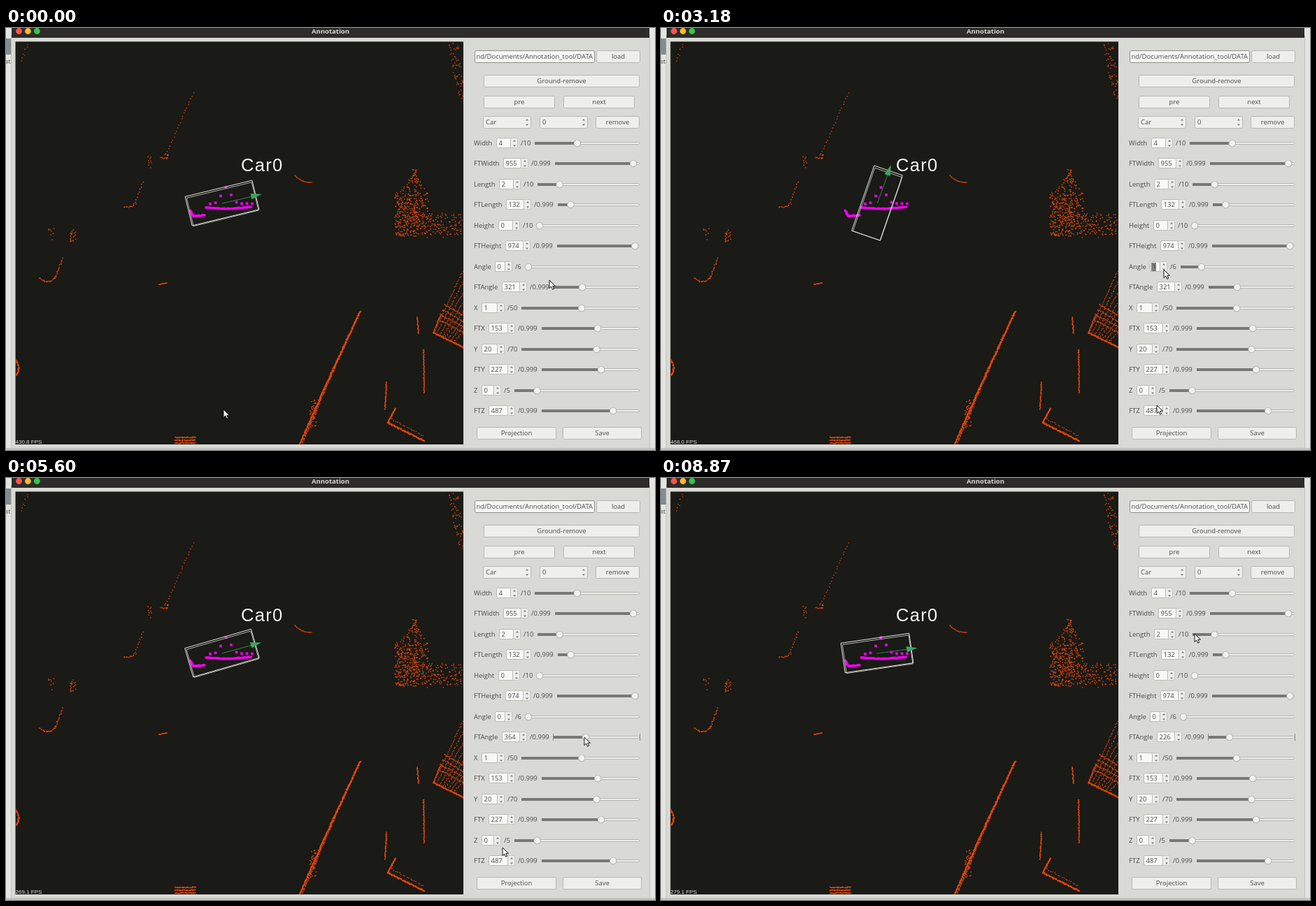
An HTML page with a canvas for the animation above (8.97 s loop, 928 px wide and 604 px high).

```html
<!DOCTYPE html>
<html lang="en">
<head>
<meta charset="utf-8">
<title>Annotation</title>
<style>
html, body { margin: 0; width: 100%; height: 100%; overflow: hidden; background: #dedfda; }
canvas { display: block; width: 928px; height: 604px; }
</style>
</head>
<body>
<canvas id="stage" width="928" height="604"></canvas>
<script>
const W = 928, H = 604, LOOP = 8970, STEP = 130;
const ctx = document.getElementById('stage').getContext('2d');
const UI = '9.5px "Open Sans", "Noto Sans", sans-serif';
const ARIAL = '"Liberation Sans", Arial, sans-serif';
const INK = '#4a4a48';

let seed = 7;
function rnd() {
  seed = (seed * 1664525 + 1013904223) % 4294967296;
  return seed / 4294967296;
}
const jit = a => (rnd() - 0.5) * 2 * a;
const clamp = (v, lo, hi) => Math.min(hi, Math.max(lo, v));

function text(c, s, x, y, font, color, align = 'left') {
  c.font = font;
  c.fillStyle = color;
  c.textAlign = align;
  c.fillText(s, x, y);
}
const label = (c, s, x, mid, align) => text(c, s, x, mid + 3.4, UI, INK, align);

function rect(c, color, x, y, w, h) {
  c.fillStyle = color;
  c.fillRect(x, y, w, h);
}

function box(c, x, y, w, h, fill, border = '#b8b8b2', r = 2) {
  c.beginPath();
  c.roundRect(x + 0.5, y + 0.5, w - 1, h - 1, r);
  c.fillStyle = fill;
  c.fill();
  c.strokeStyle = border;
  c.lineWidth = 1;
  c.stroke();
}

function disc(c, x, y, r, fill) {
  c.beginPath();
  c.arc(x, y, r, 0, 7);
  c.fillStyle = fill;
  c.fill();
}

function button(c, s, x, y, w) {
  box(c, x, y, w, 18, '#eeeeea');
  label(c, s, x + w / 2, y + 9, 'center');
}

function arrows(c, x, mid) {
  c.fillStyle = '#7c7c78';
  for (const d of [-1, 1]) {
    c.beginPath();
    c.moveTo(x - 2, mid + d * 2.5);
    c.lineTo(x + 2, mid + d * 2.5);
    c.lineTo(x, mid + d * 5);
    c.fill();
  }
}

// name, value, limit, lowest value; every property also has a fine "FT" row
const props = [
  ['Width', 4, 10, 0, 955], ['Length', 2, 10, 0, 132], ['Height', 0, 10, 0, 974], ['Angle', 0, 6, 0, 321],
  ['X', 1, 50, -50, 153], ['Y', 20, 70, -70, 227], ['Z', 0, 5, -1, 487]
];
const rows = props.flatMap(([name, value, max, min, fine]) => [
  { name, value, max, min, limit: '/' + max },
  { name: 'FT' + name, value: fine, max: 999, min: min < 0 ? -999 : 0, limit: '/0.999' }
]);
ctx.font = UI;
rows.forEach((r, i) => {
  const width = s => ctx.measureText(s).width;
  r.y = Math.round(165 + i * 29.46);
  r.spin = Math.round(674.5 + width(r.name));
  r.spinW = Math.round(20 + 5.3 * String(r.max).length + (r.min < 0 ? 2.5 : 0));
  r.limitX = r.spin + r.spinW + 4;
  r.track = Math.round(r.limitX + width(r.limit) + 6);
});

function drawRow(c, r, value = r.value, picked = false, focus = false) {
  const { y, spin, spinW, track } = r;
  const knob = track + 4 + (898 - track) * (value - r.min) / (r.max - r.min);
  label(c, r.name, 669, y);
  box(c, spin, y - 8, spinW, 15, '#ededea', '#c6c6c1');
  box(c, spin, y - 8, spinW - 10, 15, '#f8f8f6', '#bbbbb5');
  if (picked) rect(c, '#80807d', spin + 2, y - 6, 7, 12);
  label(c, value, spin + 3.5, y);
  arrows(c, spin + spinW - 5, y);
  label(c, r.limit, r.limitX, y);
  box(c, track, y - 2, 906 - track, 4, '#eeeeeb', '#b6b6b1', 1);
  rect(c, '#787875', track, y - 2, knob - track, 4);
  if (focus) for (const x of [track - 1, 906]) rect(c, '#8d8d89', x, y - 5, 1, 10);
  disc(c, knob, y, 5.2, '#adada7');
  disc(c, knob, y, 4.4, '#f1f1ee');
}

function dot(c, x, y, s = 1.5) { c.fillRect(x - s / 2, y - s / 2, s, s); }

// dots along a line that may bulge sideways
function trail(c, x1, y1, x2, y2, step = 1.2, j = 0.6, s = 1.6, bend = 0) {
  const dx = x2 - x1, dy = y2 - y1, len = Math.hypot(dx, dy), n = Math.ceil(len / step);
  for (let i = 0; i <= n; i++) {
    const k = i / n, b = bend * 4 * k * (1 - k) / len;
    dot(c, x1 + dx * k - dy * b + jit(j), y1 + dy * k + dx * b + jit(j), s);
  }
}

function blob(c, x, y, rx, ry, n) {
  while (n--) dot(c, x + jit(rx), y + jit(ry), 1.5);
}

function bush(c) {
  for (let i = 0; i < 360; i++) {
    const y = 194 + 104 * Math.sqrt(rnd()), k = clamp((y - 212) / 26, 0, 1);
    dot(c, 584 - 4 * k + jit(3 + 21 * k), y, 1.5);
  }
  blob(c, 574, 260, 14, 22, 70);
  for (let i = 0; i < 110; i++) dot(c, 602 + 51 * rnd(), 264 + 36 * rnd(), 1.5);
}

function corner(c) {
  for (let i = 0; i < 8; i++) trail(c, 654 + i * 4, 346 + i * 9, 613 + i * 4, 434 + i * 2, 2.6, 0.8, 1.4);
  for (let i = 0; i < 4; i++) trail(c, 618 + i * 3, 417 - i * 7, 656, 437 - i * 8, 1.8, 0.8, 1.5);
  trail(c, 611, 436, 656, 458, 0.9, 0.7, 1.9);
  trail(c, 611, 436, 622, 410);
}

function cloud(c) {
  c.fillStyle = '#d8450f';
  trail(c, 32, 22, 22, 46, 4, 2, 1.3);
  trail(c, 268, 93, 229, 181, 4.8, 1, 1.4);
  trail(c, 196, 220, 186, 245, 4, 1);
  trail(c, 186, 250, 169, 256, 1.5, 1.2, 1.5, -3);
  blob(c, 226, 184, 6, 3, 14);
  blob(c, 207, 192, 4, 8, 9);
  blob(c, 62, 297, 8, 12, 8);
  blob(c, 96, 297, 4, 9, 20);
  trail(c, 81, 330, 71, 356, 2.2, 0.8);
  trail(c, 71, 356, 48, 358, 1.3, 0.9, 1.6, -6);
  trail(c, 219, 367, 230, 365, 1, 0.3);
  trail(c, 413, 211, 437, 221, 1.2, 0.4, 1.4, 3);
  trail(c, 14, 475, 14, 498, 1, 1, 2, -4);
  for (let i = 0; i < 75; i++) {
    const y = 21 + 80 * rnd();
    dot(c, 631 + (y - 20) * 0.2 + 15 * rnd(), y, 1.4);
  }
  bush(c);
  corner(c);
  // walls and posts along the bottom
  c.fillStyle = '#e8480c';
  trail(c, 507, 405, 420, 596, 1, 0.8, 1.9, 1);
  trail(c, 504, 411, 424, 594, 2, 0.8, 1.6, 1);
  blob(c, 439, 552, 5, 20, 36);
  trail(c, 588, 414, 590, 437);
  trail(c, 597, 460, 598, 522);
  trail(c, 544, 507, 542, 546);
  trail(c, 557, 544, 546, 565, 0.9, 0.8, 1.9);
  trail(c, 546, 565, 598, 591, 0.9, 0.8, 1.9);
  trail(c, 552, 560, 597, 584, 3, 0.8, 1.4);
  for (let y = 586; y < 598; y += 4) trail(c, 242, y, 271, y, 1.1, 0.7);

  c.fillStyle = '#f500f5';
  trail(c, 263, 261, 268, 269, 1.5, 0.5, 3.2);
  trail(c, 268, 269, 284, 268, 1.5, 0.5, 3.2);
  trail(c, 286, 257, 350, 256, 1.5, 0.5, 3.2, 2);
  for (let x = 292; x < 356; x += 7.5) dot(c, x, 252 - 24 * Math.exp(-(((x - 315) / 9) ** 2)) + jit(1), 3.6);
}

function backdrop(c) {
  rect(c, '#e4e4e1', 0, 0, W, H);
  rect(c, '#858b8e', 0, 15, 8, 23);
  text(c, 'ati', -2, 51, UI, '#555');
  rect(c, '#c4c4c0', 0, 601, W, 3);
  rect(c, '#c0c0bb', 7, 10, 914, 592);
  rect(c, '#d9dad5', 8, 0, 912, 601);
  rect(c, '#2d2c2a', 8, 0, 912, 14);
  ['#f8564f', '#f8bb32', '#35c749'].forEach((col, i) => disc(c, 18.5 + i * 12.9, 4.5, 4.4, col));
  text(c, 'Annotation', 464, 8.3, 'bold ' + UI, '#dcdad4', 'center');

  c.save();
  c.beginPath();
  c.rect(13.5, 19.5, 640.5, 576.5);
  c.fillStyle = '#1a1a16';
  c.fill();
  c.clip();
  cloud(c);
  c.restore();
  c.letterSpacing = '1.3px';
  text(c, 'Car0', 336, 205, '25.5px ' + ARIAL, '#f4f4f2');
  c.letterSpacing = '0px';

  box(c, 670, 32, 172, 18, '#f6f6f4', '#8e8e89');
  label(c, 'nd/Documents/Annotation_tool/DATA', 839, 41, 'right');
  button(c, 'load', 844, 32, 63);
  button(c, 'Ground-remove', 683, 67, 223);
  button(c, 'pre', 683, 97, 102);
  button(c, 'next', 797, 97, 102);
  for (const [s, x] of [['Car', 682], ['0', 763]]) {
    box(c, x, 126, 69, 18, '#efefec');
    label(c, s, x + 4, 135);
    arrows(c, x + 63, 135);
  }
  button(c, 'remove', 843, 126, 63);
  rows.filter(r => !r.name.endsWith('Angle')).forEach(r => drawRow(c, r));
  button(c, 'Projection', 673, 571, 114);
  button(c, 'Save', 796, 571, 113);
}

const still = document.createElement('canvas');
still.width = W;
still.height = H;
backdrop(still.getContext('2d'));

// keys: [time, x, y], eased between neighbours
function at(keys, t) {
  const i = keys.findLastIndex(k => k[0] <= t);
  const a = keys[i], b = keys[i + 1] || a;
  const k = b === a ? 0 : (t - a[0]) / (b[0] - a[0]), e = k * k * (3 - 2 * k);
  return [a[1] + (b[1] - a[1]) * e, a[2] + (b[2] - a[2]) * e];
}

const GRAB = 4290, DROP = 7020;
const pointer = [[0, 777, 361], [1170, 719, 340], [2080, 717, 352], [3120, 719, 346], [3510, 719, 346],
  [GRAB, 821.9, 366], [4680, 828.8, 366], [5590, 826.9, 371], [DROP, 811, 372], [8840, 763, 223]];
const guest = [[0, 311, 546], [1170, 326, 546], [2210, 326, 546], [3120, 709, 540], [3640, 710, 529],
  [5720, 710, 529], [6760, 936, 612]];
// time, whole angle, frame rate
const states = [[0, 0, '430.8'], [1430, 1, '468.0'], [3510, 0, '275.0'], [5590, 0, '269.1'], [DROP, 0, '279.1']];

function shape(c, pts) {
  c.beginPath();
  pts.forEach(p => c.lineTo(...p));
  c.closePath();
}

function cuboid(angle) {
  const ca = Math.cos(angle), sa = Math.sin(angle);
  const place = (u, v) => [309 + u * ca + v * sa, 250.5 - u * sa + v * ca];
  const top = [place(-49.3, -21.4), place(49.3, -21.4), place(49.3, 21.4), place(-49.3, 21.4)];
  // the lower face recedes towards the middle of the view
  const base = top.map(([x, y]) => [x + (333 - x) * 0.03, y + (308 - y) * 0.03]);
  ctx.lineWidth = 1;
  for (const [face, color] of [[base, '#b4b4b0'], [top, '#e6e6e2']]) {
    shape(ctx, face);
    ctx.strokeStyle = color;
    ctx.stroke();
  }
  shape(ctx, [place(0, 0.5), place(44, 1)]);
  ctx.strokeStyle = '#2c6b44';
  ctx.stroke();
  shape(ctx, [place(58, 1), place(42.5, -3.5), place(42.5, 5)]);
  ctx.fillStyle = '#3aa65c';
  ctx.fill();
}

function cursor([x, y]) {
  const pts = [[0, 0], [0, 11.5], [2.7, 9], [4.6, 13.2], [6.6, 12.3], [4.8, 8.3], [8.4, 8.2]];
  shape(ctx, pts.map(([a, b]) => [x + a, y + b]));
  ctx.fillStyle = '#fafafa';
  ctx.fill();
  ctx.strokeStyle = '#161616';
  ctx.lineWidth = 1;
  ctx.stroke();
}

function draw(now) {
  const t = Math.floor((now % LOOP) / STEP) * STEP;
  const [, whole, rate] = states.findLast(s => s[0] <= t);
  // the fine angle follows the pointer while its slider is held
  const held = at(pointer, clamp(t, GRAB, DROP))[0];
  const fine = Math.round((held - 785) / 0.115);
  ctx.drawImage(still, 0, 0);
  cuboid(whole + fine / 1000 - 0.083);
  text(ctx, rate + ' FPS', 13.5, 595, '8px ' + ARIAL, '#e2e2de');
  drawRow(ctx, rows[6], whole, whole === 1);
  drawRow(ctx, rows[7], fine, false, t >= GRAB);
  cursor(at(guest, t));
  cursor(at(pointer, t));
}

const start = performance.now();
function tick(now) {
  draw(Math.max(0, now - start));
  requestAnimationFrame(tick);
}
draw(0);
requestAnimationFrame(tick);
</script>
</body>
</html>
```
